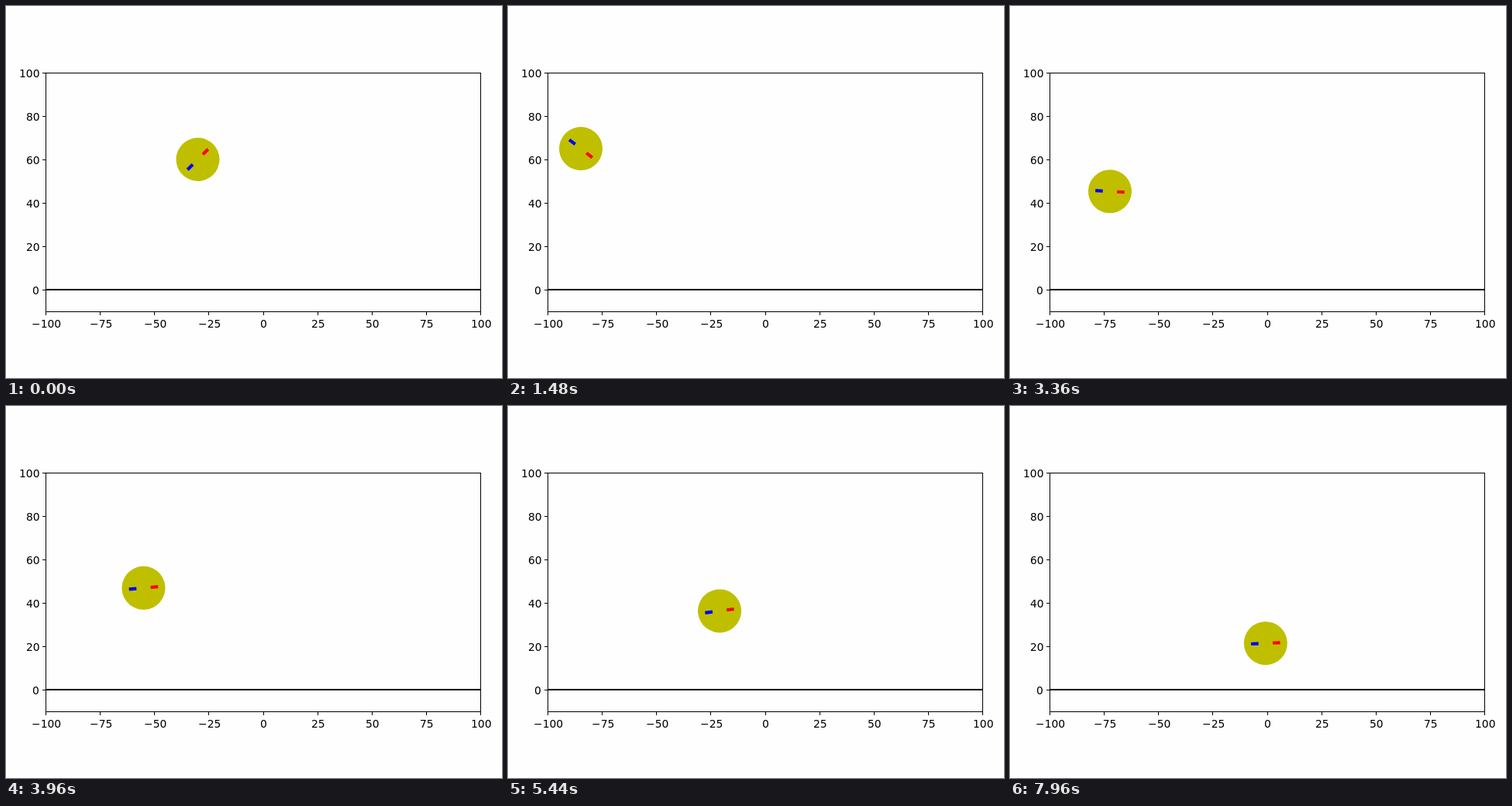
An HTML page for the animation above (8 s loop, 640 by 480 pixels).

```html
<!DOCTYPE html>
<html lang="en">
<head>
<meta charset="utf-8">
<title>Tilting ball</title>
<style>
  html, body { margin: 0; width: 100%; height: 100%; overflow: hidden; background: #fefefe; }
  svg { display: block; width: 640px; height: 480px; }
  text { font: 13.89px "DejaVu Sans", sans-serif; }
  .axis { fill: none; stroke: #000; stroke-width: 1; shape-rendering: crispEdges; }
  .ground { stroke: #000; stroke-width: 2; }
  .mark { stroke-width: 4.17; }
</style>
</head>
<body>
<svg viewBox="0 0 640 480">
  <clipPath id="plot"><rect x="51" y="86" width="562" height="309"/></clipPath>
  <g clip-path="url(#plot)">
    <g id="ball">
      <circle r="28" fill="#bfbf00"/>
      <path class="mark" stroke="#f00" d="M9.2 0H18.8"/>
      <path class="mark" stroke="#00f" d="M-18.8 0H-9.2"/>
    </g>
    <path class="ground" d="M51 366H613"/>
  </g>
  <g id="axes"><rect class="axis" x="51.5" y="86.5" width="561" height="308"/></g>
</svg>
<script>
const LOOP = 8000, STEP = 40, KEY_GAP = 20, WALL = 79.05;
const axes = document.getElementById('axes');
const ball = document.getElementById('ball');

function add(tag, attributes) {
  const node = document.createElementNS('http://www.w3.org/2000/svg', tag);
  for (const key in attributes) node.setAttribute(key, attributes[key]);
  return axes.appendChild(node);
}

// Starts each label on a whole pixel; align is the share of its width left of x.
function addLabel(value, x, y, align) {
  const node = add('text', { y });
  node.textContent = String(value).replace('-', '\u2212');
  node.setAttribute('x', Math.round(x - align * node.getComputedTextLength()));
}

for (let value = -100; value <= 100; value += 25) {
  const x = 331.5 + value * 2.805;
  add('path', { class: 'axis', d: `M${Math.round(x) + 0.5} 395v4` });
  addLabel(value, x + 1.2, 415, 0.5);
}
for (let value = 0; value <= 100; value += 20) {
  const y = 366.5 - value * 2.8;
  add('path', { class: 'axis', d: `M47 ${y}h4` });
  addLabel(value, 43.3, y + 5.5, 1);
}

// Cubic spline through evenly spaced values, with given slopes at both ends.
function spline(startSlope, endSlope, values) {
  const last = values.length - 1;
  const slopes = values.map(() => 0);
  slopes[0] = startSlope;
  slopes[last] = endSlope;
  for (let pass = 0; pass < 30; pass++) {
    for (let i = 1; i < last; i++) {
      slopes[i] = (3 * (values[i + 1] - values[i - 1]) - slopes[i - 1] - slopes[i + 1]) / 4;
    }
  }
  return position => {
    const i = Math.min(Math.floor(position), last - 1);
    const s = position - i, r = 1 - s;
    return r * r * (1 + 2 * s) * values[i] + s * s * (3 - 2 * s) * values[i + 1]
      + s * r * (r * slopes[i] - s * slopes[i + 1]);
  };
}

// The free path swings past the wall; the ball is held at the wall meanwhile.
const pathX = spline(-36, 5.6, [247.5, 170.4, 84, 64, 115.7, 180.6, 237.5, 280.3, 307.4, 322.4, 330.1]);
const pathY = spline(-60, 6.6, [198, 171.3, 188.8, 226.3, 240, 234.8, 247.9, 268.5, 286.6, 298.5, 306.5]);
const tilt = spline(-24, -1.4, [45, 2.5, -41, -26, -6, 5.2, 8, 7.2, 5.6, 4, 2.5]);

const start = performance.now();
function draw() {
  const key = Math.floor((performance.now() - start) % LOOP / STEP) / KEY_GAP;
  const x = Math.max(WALL, pathX(key));
  ball.setAttribute('transform', `translate(${x} ${pathY(key)}) rotate(${-tilt(key)})`);
  requestAnimationFrame(draw);
}
draw();
</script>
</body>
</html>
```
